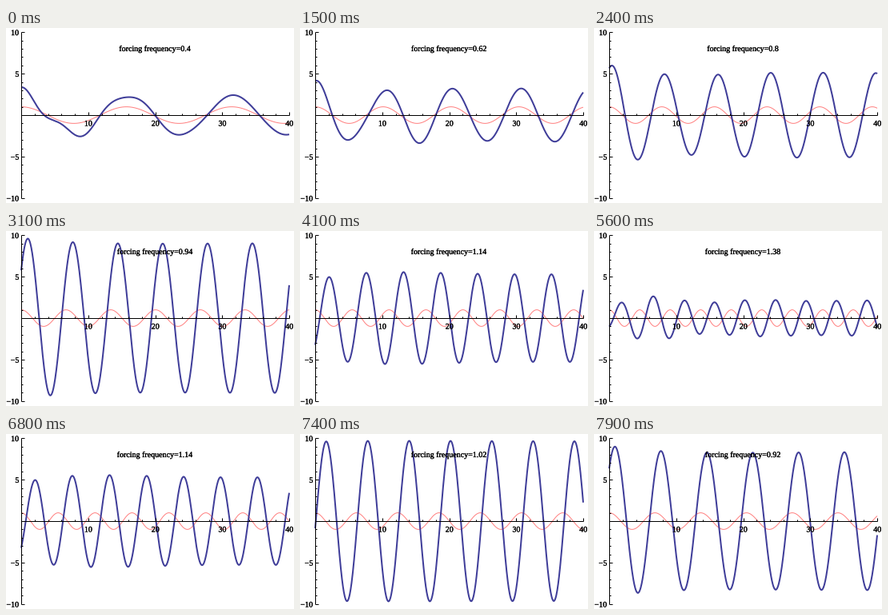
These frames come from a looping animation (360x219 px, 8 s). A matplotlib script:

```python
import numpy as np
import matplotlib.pyplot as plt
from matplotlib.animation import FuncAnimation
from matplotlib.patches import Rectangle
from matplotlib.patheffects import withStroke

W, H, DPI = 360, 219, 64
PT = 72 / DPI                      # points per pixel
X0, Y0, SX, SY = 19, 109, 8.375, 10.375
DAMP, FORCE = 0.2, 2.0
BLUE, PINK = (0.247, 0.24, 0.6), (1, 0.5, 0.5)

plt.rcParams["font.family"] = "Liberation Serif"


def px(t):
    return X0 + SX * t


def py(v):
    return Y0 - SY * v


def response(t, w):
    """x'' + DAMP x' + x = FORCE cos(w t): steady part plus a unit transient."""
    a, b = 1 - w * w, DAMP * w
    steady = FORCE * (a * np.cos(w * t) + b * np.sin(w * t)) / (a * a + b * b)
    g = DAMP / 2
    wd = np.sqrt(1 - g * g)
    transient = np.exp(-g * t) * (np.cos(wd * t) + g / wd * np.sin(wd * t))
    return steady + transient


def frequency(n):
    """Hundredths: wait, climb from 0.40 to 1.40, then come back down."""
    return 40 + 2 * max(0, min(n - 4, 50, 105 - n))


def label(cents):
    s = f"{cents / 100:g}"
    return s if "." in s else s + "."


fig = plt.figure(figsize=(W / DPI, H / DPI), dpi=DPI, facecolor="white")
ax = fig.add_axes([0, 0, 1, 1])
ax.set_xlim(0, W)
ax.set_ylim(H, 0)
ax.axis("off")

bolder = [withStroke(linewidth=0.25 * PT, foreground="black")]


def stroke(xs, ys):
    ax.plot(xs, ys, color="black", lw=PT, snap=True,
            solid_capstyle="butt", zorder=4)


def write(x, y, s, ha):
    return ax.text(x, y, s, ha=ha, va="baseline", fontsize=10 * PT,
                   color="black", zorder=5, path_effects=bolder)


# axes, ticks and tick labels
stroke([px(0), px(40)], [Y0, Y0])
stroke([X0, X0], [py(10), py(-10)])
for t in range(0, 41, 2):
    major = t % 10 == 0
    stroke([px(t)] * 2, [Y0, Y0 - (4 if major else 2)])
    if major and t:
        write(px(t) + 0.2, 122.5, str(t), "center")
for v in range(-10, 11):
    major = v % 5 == 0
    stroke([X0, X0 + (4 if major else 2)], [py(v)] * 2)
    if major and v:
        write(16.2, py(v) + 3.8, str(v).replace("-", "\u2212"), "right")

time = np.linspace(0, 40, 900)
drive, = ax.plot([], [], color=PINK, lw=PT, zorder=2, solid_capstyle="butt")
motion, = ax.plot([], [], color=BLUE, lw=2 * PT, zorder=3,
                  solid_capstyle="butt")
window = Rectangle((0, py(10) - 1), W, 20 * SY + 2, transform=ax.transData)
motion.set_clip_path(window)
caption = write(px(20) - 0.2, 29, "", "center")


def draw(n):
    cents = frequency(n)
    w = cents / 100
    drive.set_data(px(time), py(np.cos(w * time)))
    motion.set_data(px(time), py(response(time, w)))
    caption.set_text("forcing frequency=" + label(cents))
    return drive, motion, caption


anim = FuncAnimation(fig, draw, frames=80, interval=100, repeat=True,
                     repeat_delay=0, blit=False)
plt.show()
```
